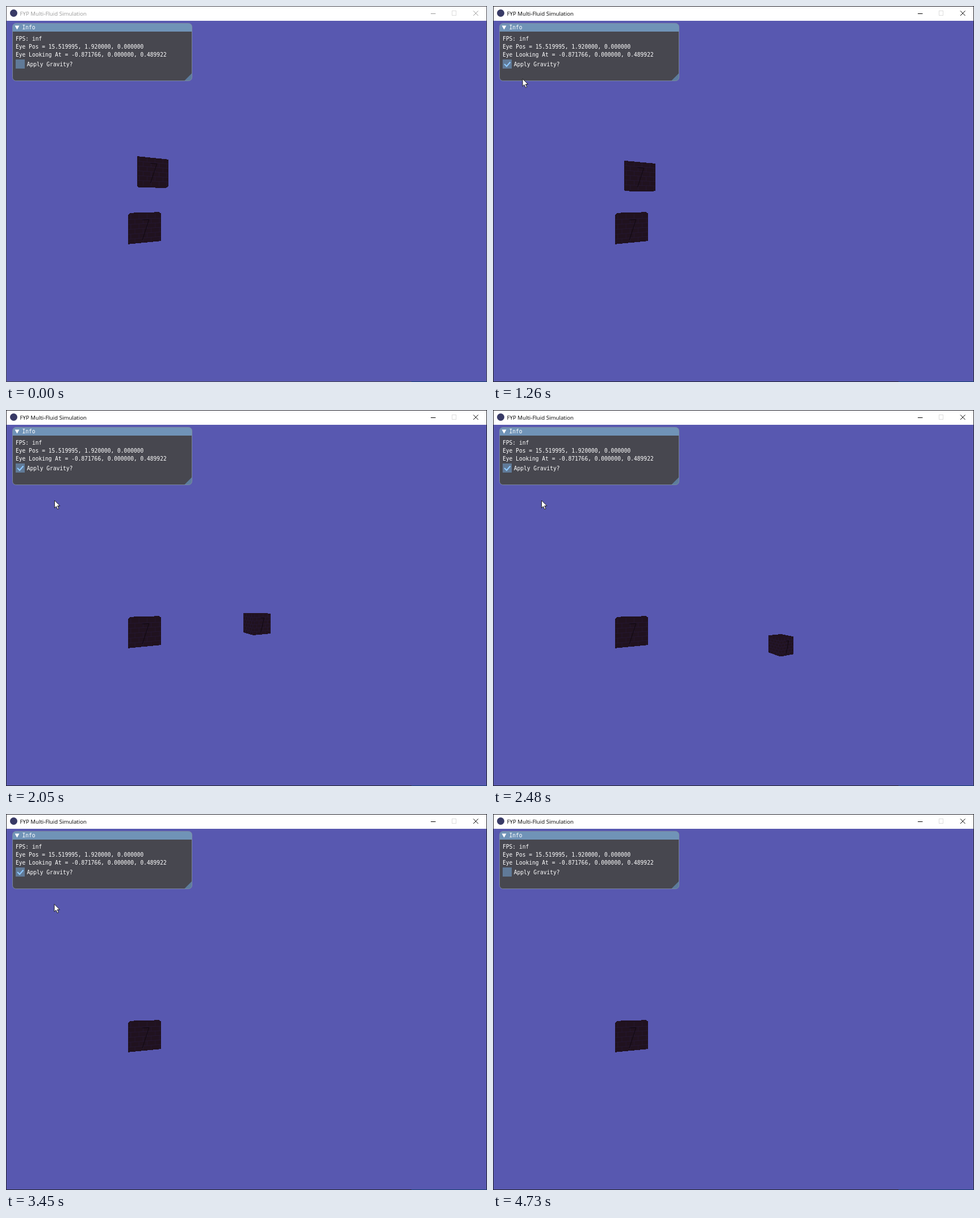
Recreate the animation shown at these times as an HTML page. Size 847x661 px, loop 4980 ms.

```html
<!DOCTYPE html>
<html lang="en">
<head>
<meta charset="utf-8">
<title>FYP Multi-Fluid Simulation</title>
<style>
  html, body { margin: 0; width: 100%; height: 100%; overflow: hidden; background: #5858b0; }
  svg { display: block; width: 847px; height: 661px; }
  text { white-space: pre; }
  .title { font: 9.7px "Open Sans", "Noto Sans", sans-serif; fill: #999; }
  .buttons { stroke: #999; fill: none; }
  .active .title { fill: #000; }
  .active .buttons { stroke: #000; }
  .frame { fill: none; stroke: #484850; }
  .active .frame { stroke: #24242c; }
  .info text { font: 9.6px "DejaVu Sans Mono", "Liberation Mono", monospace; fill: #fff; }
  .body { fill: #20121f; shape-rendering: crispEdges; }
  .mortar { fill: none; stroke: #281a38; stroke-width: .7; }
  .crack { fill: none; stroke: #0f0810; stroke-width: 1; }
</style>
</head>
<body>
<svg id="stage" viewBox="0 0 847 661">
  <rect width="847" height="661" fill="#5858b0"/>
  <g id="cubes"></g>

  <rect width="847" height="26" fill="#fff"/>
  <circle cx="13.5" cy="12.5" r="6.5" fill="#383a66"/>
  <text class="title" x="24.5" y="16.5">FYP Multi-Fluid Simulation</text>
  <rect x="785.5" y="8.5" width="7" height="8" fill="none" stroke="#ddd"/>
  <path class="buttons" d="M748 13.5h8.5M823 8.5l8.5 8.5M831.5 8.5l-8.5 8.5"/>
  <rect class="frame" x=".5" y=".5" width="846" height="660"/>
  <path d="M714 660.5H847" stroke="#173f70"/>

  <g class="info">
    <rect x="11.5" y="30.5" width="316" height="101" rx="6" fill="#47474f"/>
    <path d="M11.5 45V36.5a6 6 0 0 1 6-6h304a6 6 0 0 1 6 6V45z" fill="#7093b7"/>
    <path d="M327.5 118v7.5a6 6 0 0 1-6 6H314z" fill="#5d7c9d"/>
    <rect x="11.5" y="30.5" width="316" height="101" rx="6" fill="none" stroke="#8392a6" stroke-width=".8"/>
    <path d="M15.5 34.5h8l-4 7z" fill="#fff"/>
    <text x="28.5" y="41.3">Info</text>
    <text x="17" y="61.3">FPS: inf</text>
    <text x="17" y="75.3">Eye Pos = 15.519995, 1.920000, 0.000000</text>
    <text x="17" y="89.3">Eye Looking At = -0.871766, 0.000000, 0.489922</text>
    <rect id="box" x="17" y="94" width="16" height="16" fill="#607a98"/>
    <path id="tick" d="M20 102l4 4 6.5-7.5" fill="none" stroke="#8fcaff" stroke-width="2"/>
    <text x="36.7" y="106.3">Apply Gravity?</text>
  </g>
  <path id="cursor" d="M0 0V13.2l3-2.8 2.3 5.1 2.2-1-2.3-4.9H9.5z" fill="#fff" stroke="#111" stroke-width=".9"/>
</svg>
<script>
const LOOP = 4980, STEP = 60.7;
const $ = id => document.getElementById(id);
const mix = (a, b, k) => a + (b - a) * k;
const clamp = k => Math.min(1, Math.max(0, k));
const ease = k => k * k * (3 - 2 * k);

// Camera with a 90 degree field of view, matching the values in the panel.
const EYE = { x: 15.52, y: 1.92 }, LOOK = { x: -.8718, z: .4899 };
const CENTER = { x: 423.5, y: 342.7 }, FOCAL = 317;

function project(x, y, z) {
  const dx = x - EYE.x, dy = EYE.y - y;
  const scale = FOCAL / (LOOK.x * dx + LOOK.z * z);
  return [CENTER.x + scale * (LOOK.z * dx - LOOK.x * z), CENTER.y + scale * dy];
}

// Corner numbers hold one bit per axis: 4 for x, 2 for y, 1 for z.
const FRONT = [6, 7, 5, 4], SIDE = [2, 6, 4, 0], TOP = [2, 3, 7, 6], BOTTOM = [0, 4, 5, 1];

function makeCube() {
  return ['body', 'mortar', 'crack'].map(name => {
    const path = document.createElementNS('http://www.w3.org/2000/svg', 'path');
    path.setAttribute('class', name);
    $('cubes').append(path);
    return path;
  });
}

const area = q => q.reduce((sum, [x, y], i) => {
  const [nx, ny] = q[(i + 1) % 4];
  return sum + x * ny - nx * y;
}, 0) / 2;

const line = points => 'M' + points.map(p => p.map(v => v.toFixed(2))).join('L');

const onFace = ([a, b, c, d], u, v) =>
  [0, 1].map(i => mix(mix(a[i], b[i], u), mix(d[i], c[i], u), v));

function bricks(q) {
  const rows = 6, cols = 4;
  let d = '';
  for (let r = 0; r < rows; r++) {
    const top = r / rows, end = (r + 1) / rows;
    if (r) d += line([onFace(q, 0, top), onFace(q, 1, top)]);
    for (let c = 0; c < cols; c++) {
      const u = (c + (r % 2 ? .8 : .3)) / cols;
      d += line([onFace(q, u, top), onFace(q, u, end)]);
    }
  }
  return d;
}

// A cube two units wide around the point x, y, z.
function drawCube([body, mortar, crack], x, y, z) {
  const corner = i => project(x + (i & 4 ? 1 : -1), y + (i & 2 ? 1 : -1), z + (i & 1 ? 1 : -1));
  const faces = [FRONT, SIDE, TOP, BOTTOM].map(f => f.map(corner)).filter(q => area(q) > 0);
  body.setAttribute('d', faces.map(q => line(q) + 'z').join(''));
  mortar.setAttribute('d', faces.filter(q => area(q) > 300).map(bricks).join(''));
  const seven = [[.43, .2], [.63, .2], [.43, .9]];
  crack.setAttribute('d', line(seven.map(p => onFace(faces[0], ...p))));
}

// Seconds: drop onto the lower cube, slide off along z, then fall out of view.
const DROP = 1.145, HIT = 1.45, FALL = 2.125, GRAVITY = 43;

function fallingCube(s) {
  const dropped = t0 => GRAVITY / 2 * Math.max(0, s - t0) ** 2;
  const y = s < HIT ? 4 - dropped(DROP) : 2 * Math.exp(-5.8 * (s - HIT)) - dropped(FALL);
  const z = Math.min(15, .5 + 15.6 * Math.max(0, s - HIT));
  return [0, y, z];
}

// Pointer moves: start, end, target.
const MOVES = [
  [0, 460, 8, 84], [460, 700, 23, 101], [1140, 1400, 85.5, 159],
  [3430, 3800, 27, 95], [4040, 4640, 779, 655]
];

function pointer(t) {
  return MOVES.reduce((pos, [start, end, ...to]) => {
    const k = ease(clamp((t - start) / (end - start)));
    return pos.map((v, i) => mix(v, to[i], k));
  }, [745, 655]);
}

const falling = makeCube(), resting = makeCube();
drawCube(resting, 0, 0, 0);

function draw(t) {
  drawCube(falling, ...fallingCube(t / 1000));

  const [x, y] = pointer(t);
  $('cursor').setAttribute('transform', `translate(${x} ${y})`);
  $('cursor').style.display = t > 0 && t < 4715 ? '' : 'none';
  const hover = x >= 17 && x < 117 && y >= 94 && y < 110;
  $('box').setAttribute('fill', hover ? '#6988aa' : '#607a98');
  $('tick').style.display = t >= 1110 && t < 4000 ? '' : 'none';
  $('stage').classList.toggle('active', t >= 1020);
}

// The picture advances in steps of about 61 ms.
function tick() {
  const t = performance.now() % LOOP;
  draw(50 + STEP * Math.floor((t - 42) / STEP));
  requestAnimationFrame(tick);
}
tick();
</script>
</body>
</html>
```
